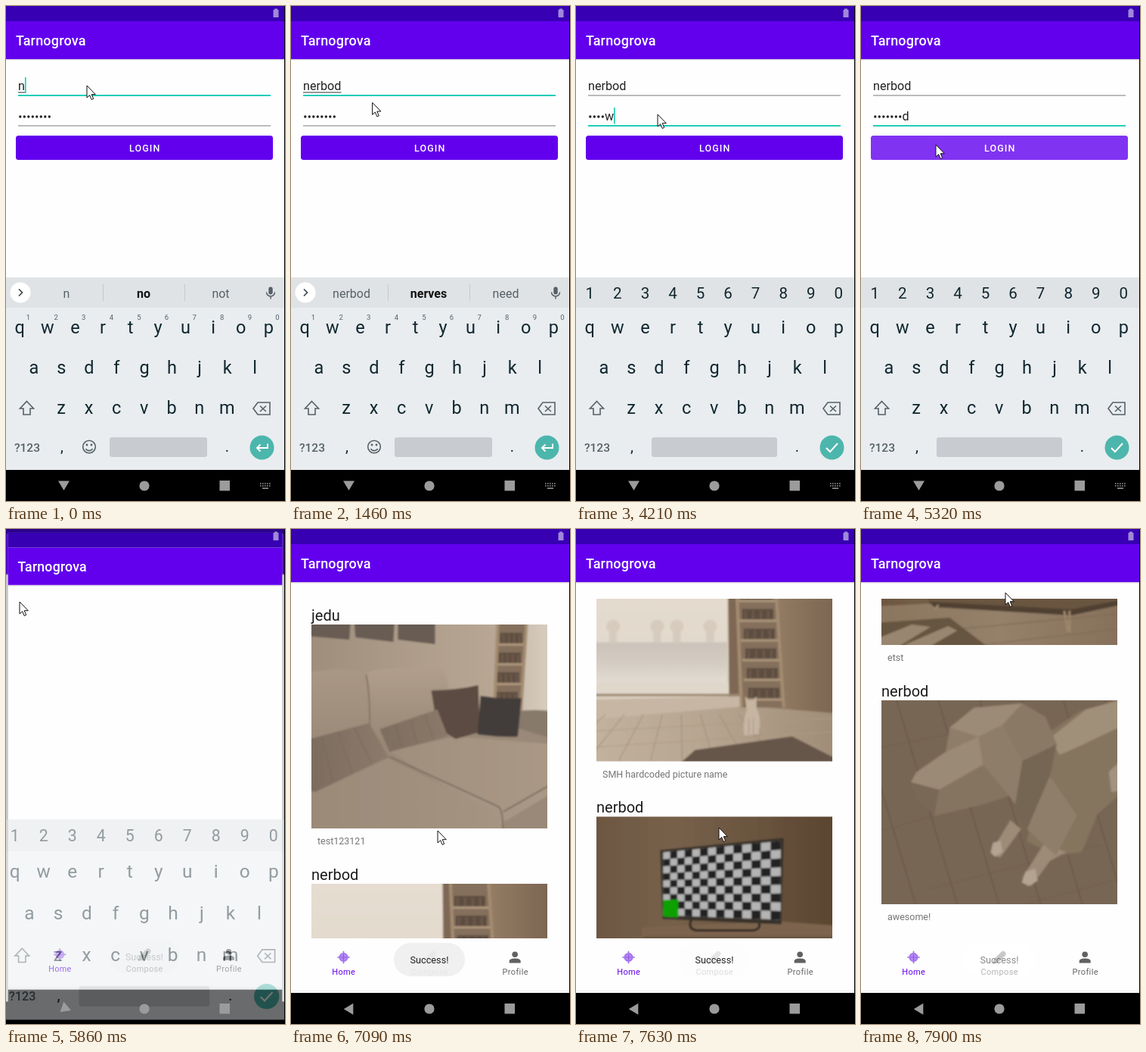
These frames come from a looping animation (369x653 px, 8000 ms). An HTML page:

```html
<!DOCTYPE html>
<html lang="en">
<head>
<meta charset="utf-8">
<title>Login and feed</title>
<style>
html, body { margin: 0; width: 100%; height: 100%; overflow: hidden; background: #000; }
svg { display: block; font-family: Roboto, sans-serif; }
#stage { width: 369px; height: 653px; }
</style>
</head>
<body>
<svg id="stage" viewBox="0 0 369 653" xmlns="http://www.w3.org/2000/svg"></svg>
<script>
const LOOP = 8000;
const APP = 'Tarnogrova', USER = 'nerbod';
const TEAL = '#1fcdb8', PURPLE = '#6200ee', PAPER = '#fefefe';
const svg = document.getElementById('stage');
const pen = document.createElement('canvas').getContext('2d');

// ---- helpers
const clamp = (v, a = 0, b = 1) => Math.min(b, Math.max(a, v));
const range = n => [...Array(n).keys()];
const rect = (x, y, w, h, fill, more = '') =>
  `<rect x="${x}" y="${y}" width="${w}" height="${h}" fill="${fill}" ${more}/>`;
const circle = (x, y, r, fill, more = '') =>
  `<circle cx="${x}" cy="${y}" r="${r}" fill="${fill}" ${more}/>`;
const shape = (d, fill, more = '') => `<path d="${d}" fill="${fill}" ${more}/>`;
const line = (d, color, w = 1, more = '') =>
  `<path d="${d}" fill="none" stroke="${color}" stroke-width="${w}" ${more}/>`;
const text = (x, y, s, size, fill, more = '') =>
  `<text x="${x}" y="${y}" font-size="${size}" fill="${fill}" ${more}>${s}</text>`;
const mid = (x, y, s, size, fill, more = '') => text(x, y, s, size, fill, 'text-anchor="middle" ' + more);
const group = (body, more) => `<g ${more}>${body}</g>`;
const zoom = (k, dy = 0) => `transform="translate(184 ${326 + dy}) scale(${k}) translate(-184 -326)"`;
const latest = (list, t) => list.filter(e => e[0] <= t).pop();
function width(s, size) {
  pen.font = size + 'px Roboto, sans-serif';
  return pen.measureText(s).width;
}
// keys: [time, value, ...]; linear between them
function track(keys, t) {
  const i = keys.findIndex(k => k[0] > t);
  if (i < 0) return keys[keys.length - 1].slice(1);
  if (i === 0) return keys[0].slice(1);
  const a = keys[i - 1], b = keys[i], p = (t - a[0]) / (b[0] - a[0]);
  return a.slice(1).map((v, n) => v + (b[n + 1] - v) * p);
}
let fades = '';
function fade(id, down, ...colors) {
  fades += `<linearGradient id="${id}" x2="${down ? 0 : 1}" y2="${down ? 1 : 0}">` +
    colors.map((c, i) => `<stop offset="${i / (colors.length - 1)}" stop-color="${c}"/>`).join('') + '</linearGradient>';
  return `url(#${id})`;
}

// ---- timing: the screen refreshes in steps [from, to, count]
const STEPS = [[0, 0, 1], [120, 600, 5], [1060, 1060, 1], [1460, 2030, 5], [2310, 2460, 2],
  [2860, 3010, 2], [3540, 3940, 4], [4210, 4210, 1], [4490, 4640, 2], [5010, 5860, 7],
  [5980, 5980, 1], [6140, 7090, 8], [7210, 7630, 4], [7780, 7900, 2]]
  .flatMap(([a, b, n]) => range(n).map(i => n > 1 ? a + (b - a) * i / (n - 1) : a));

const MOUSE = [[0, 107, 105], [1060, 107, 105], [1740, 108, 143], [4640, 108, 143], [5150, 100, 183],
  [5430, 98, 183], [5860, 18, 96], [6410, 18, 96], [7090, 194, 398], [7210, 193, 330],
  [7350, 191, 110], [7490, 190, 240], [7630, 189, 394], [7780, 190, 235], [7900, 191, 84]];
const SCROLL = [[7090, 0], [7210, 60], [7350, 280], [7490, 375], [7630, 430.5], [7780, 650], [7900, 926]];
const SECRET = [[0, 8, ''], [2455, 7, ''], [2860, 3, ''], [3005, 0, ''], [3540, 0, 'p'], [3670, 1, 'a'],
  [3800, 2, 's'], [3935, 3, 's'], [4210, 4, 'w'], [4490, 5, 'o'], [4635, 7, 'd']];
const HINTS = [['n', 'no', 'not'], ['ne', 'new', 'need'], ['ner', 'never', 'nerd'],
  ['nerb', 'nerve', 'herb'], ['nerbo', 'nerve', 'turbo'], [USER, 'nerves', 'need']];

// ---- photos, each 311 x 269
const backdrop = fill => rect(-10, -10, 331, 289, fill);
function ladder(x, y, w, h, lean) {
  const rung = 26;
  let s = shape(`M${x} -9H${x + w}L${x + w + lean} ${y + h}H${x + lean * .6}Z`, '#84705b');
  for (let i = 0; i * rung < h - 20; i++) {
    const dx = lean * (i * rung + 15) / h, yy = y + i * rung;
    s += rect(x + dx + 4, yy, w - 9, 14, '#5d4d41');
    for (const b of range(4)) s += rect(x + dx + 7 + b * (w - 10) / 4, yy + 2, 3, 12, '#6c5a4c');
    s += rect(x + dx, yy + 14, w, 3, '#ad967c');
  }
  return s + line(`M${x} -9L${x + lean * .6} ${y + h}M${x + w} -9L${x + w + lean} ${y + h}`, '#a48c71', 4);
}
function planks(x0, x1, step, d, color) {
  let s = '';
  for (let x = x0; x < x1; x += step) s += `M${x} ${d}`;
  return line(s, color);
}
const sofa = backdrop(fade('wall', 0, '#9e8d7b', '#b09f8c', '#bfae9b')) +
  planks(10, 245, 24, 'v100', '#a08f7d') +
  shape('M280 -9H321V122H270Z', fade('drape', 0, '#c9bcac', '#dad0c3')) +
  shape('M-9 -9H52L50 20 -9 15ZM56 -9H110L108 23 58 17ZM114 -9H163V26L114 20Z', '#685c52') +
  ladder(246, 11, 38, 105, -8) +
  shape('M-9 64Q40 55 65 62Q76 66 77 108V170H-9Z', fade('backL', 1, '#a99885', '#998876')) +
  shape('M72 66Q78 57 120 58L170 57Q185 66 184 150L80 165Z', fade('backR', 1, '#b09f8c', '#968573')) +
  line('M72 66Q78 90 77 160', '#84745f', 2) +
  shape('M262 116Q290 110 321 115V157L264 146Z', '#887a6b') +
  shape('M-9 178L100 160 250 130 321 152V279H-9Z', '#9a8978') +
  shape('M104 167L190 148 321 158V220L251 262Z', fade('seat', 0, '#a18f7d', '#aa9986')) +
  shape('M-9 222L100 177 252 250V279H-9Z', fade('front', 0, '#9b8a78', '#a59482')) +
  line('M102 174L246 240Q254 245 252 279M253 247L321 208', '#75665a', 1.6) +
  shape('M158 87Q195 86 220 80L222 142 190 151 166 136Z', '#5b4c42') +
  shape('M223 94Q250 99 277 97L272 148Q245 149 219 145Z', '#423c3a') +
  shape('M-9 153L76 130 102 175 5 221 -9 217Z', fade('cushL', 0, '#7b6b5d', '#8c7b6b')) +
  shape('M90 138L166 112 180 148 103 168Z', fade('cushR', 0, '#7d6d5f', '#8b7a69')) +
  line('M14 150L28 206M35 142L54 196M57 137L80 184M110 132L120 161M130 126L140 157M150 119L161 152', '#78695c');

const room = backdrop(fade('side', 0, '#a58d74', '#a58d74', '#9b836a', '#7a6350')) +
  rect(-9, -9, 184, 197, '#d9cdbd') + rect(-9, -9, 181, 123, fade('blind', 1, '#e6ddd1', '#e2d9cd')) +
  rect(-9, 112, 181, 54, fade('pane', 1, '#cbc3b9', '#d4ccc2', '#e4ddd3')) +
  [22, 80, 106, 150].map(x => circle(x, 91, 9, '#cfc2b2', 'opacity=".6"') + rect(x - 5, 98, 10, 14, '#d6cbbf')).join('') +
  rect(-9, 164, 184, 16, '#e0d7cb') +
  shape('M173 -9H182L188 190H175Z', '#7e6855') + rect(-9, 180, 197, 3, '#9a8670') +
  planks(252, 311, 20, 'v186', '#8c745e') +
  shape('M-9 188L190 183V199L-9 215Z', '#c6b6a3') +
  shape('M-9 214L200 196 321 206V279H-9Z', fade('floor', 0, '#c3b39e', '#b5a48f', '#a08c76')) +
  range(8).map(i => line(`M${12 + i * 25} 207L${-55 + i * 42} 269`, '#a08d78')).join('') +
  line('M0 229L311 212M0 250L311 230', '#ad9a84') +
  ladder(183, 16, 50, 182, 14) +
  shape('M130 254L258 236 321 268V279H102Z', '#66564a') +
  shape('M196 183L200 188H207L211 183 211 199Q218 211 214 233L195 235Q192 218 198 202Z', '#c6b6a1') +
  line('M201 212V233M207 212V233M213 226Q224 237 205 235', '#a39180');

// the board recedes to the left, so columns widen to the right
function checker(cols, rows) {
  const at = (c, r) => {
    const u = c / cols, v = r / rows, x = u / (1.22 - .22 * u);
    const top = 47 - 15 * x, low = 130 + 6 * x;
    return [(88 + 155 * x).toFixed(1), (top + (low - top) * v).toFixed(1)];
  };
  let d = '';
  for (const c of range(cols)) for (const r of range(rows))
    if ((c + r) % 2) d += `M${at(c, r)}L${at(c + 1, r)} ${at(c + 1, r + 1)} ${at(c, r + 1)}Z`;
  return d;
}
const tv = backdrop(fade('den', 0, '#6c5641', '#77614b', '#6a543f', '#59442f')) +
  planks(20, 311, 36, 'v150', '#665039') +
  shape('M60 146L240 138 321 144V160H60Z', '#7b644d') +
  shape('M62 158H321V212L250 224 62 214Z', '#69543f') +
  line('M125 136Q120 148 132 150H206Q218 149 214 138', '#2d2621', 3) +
  shape('M84 44L247 28 244 142 87 135Z', '#39322c') +
  shape('M88 47L243 32 243 136 88 130Z', '#b4b4b4') +
  shape(checker(14, 9), '#242424') + shape('M88 110L108 109V133L88 132Z', '#0aa000') +
  shape('M-9 218L70 214 250 224 321 210V279H-9Z', fade('rugside', 0, '#8a755e', '#95806a', '#86705a')) +
  shape('M62 212L250 222 321 209V215L250 230 70 219Z', '#4f4032') +
  line('M75 216L71 222M241 224L246 252M248 224L248 252', '#9d866a', 3) +
  line('M60 252L311 228M130 269L311 248', '#7d6953') +
  shape('M-9 240L90 233 150 279H-9Z', '#66543f') +
  shape('M-9 262L40 242 65 245 10 279H-9ZM30 269L88 244 100 250 62 272Z', '#99866f');

const dog = backdrop('#786654') +
  range(9).map(i => line(`M${-90 + i * 55} 0L${-10 + i * 55} 269`, '#695848', 1.5)).join('') +
  line('M0 62L90 45M0 172L110 140M60 250L290 190M190 269L311 236', '#6e5d4c') +
  shape('M218 44L262 14 285 8 321 -5V118L285 150 264 200 230 205 192 186Z', '#85745f') +
  shape('M222 50L270 12 321 -2V32L262 60 235 72Z', '#a19079') +
  shape('M300 94L321 75V118L303 121Z', '#a39280') +
  shape('M170 158L146 198 147 205 157 207 184 170ZM214 190L187 232 186 241 198 245 222 212 244 200Z', '#9c8b76') +
  shape('M147 188L157 185 160 200 150 206 144 201ZM190 226L203 222 206 238 194 245 185 240Z', '#b3a390') +
  shape('M39 108L46 95 85 68 90 36 122 10 186 4 216 22 231 58 222 84 186 150 168 126 130 138 70 152 49 131Z', '#8e7d69') +
  shape('M90 36L122 10 186 4 160 32 128 48Z', '#9c8b77') +
  shape('M46 95L85 68 128 48 134 85 76 118 39 108Z', '#9b8a76') +
  shape('M39 108L76 118 70 152 49 131Z', '#786755') +
  shape('M76 118L134 85 168 126 130 138 70 152Z', '#857461') +
  shape('M186 4L216 22 231 58 186 80 160 32Z', '#8a7965') +
  shape('M186 80L231 58 222 100 192 170 176 140Z', '#756553') +
  shape('M192 170L222 100 258 152 230 205Z', '#8f7e69');

const POSTS = [['jedu', 'test123121', sofa, 6680], [USER, 'SMH hardcoded picture name', room, 6810],
  [USER, 'etst', tv, 6900], [USER, 'awesome!', dog, 6900]];
const DEFS = `<defs>${fades}<clipPath id="list"><path d="M0 92H368V540H0Z"/></clipPath>` +
  '<filter id="soft"><feGaussianBlur stdDeviation=".9"/></filter></defs>';

// ---- screen parts
const bars = rect(0, 0, 368, 20, '#3700b3') + rect(0, 20, 368, 50, PURPLE) +
  rect(0, 70, 368, 1, '#cfc9da') + rect(0, 71, 368, 1, '#efedf2') +
  text(13, 52, APP, 18, '#fff', 'font-weight="500" letter-spacing=".2"');
const page = rect(0, 0, 368, 612, PAPER) + bars;

function login(t) {
  const second = t >= 1735, [since, dots, tail] = latest(SECRET, t);
  const name = USER.slice(0, 1 + Math.floor(clamp(t / 120, 0, 5)));
  const event = Math.max(Math.min(t, 600), second ? 1740 : 0, since);
  const caretOn = Math.floor((t - event) / 460) % 2 === 0;
  const field = (y, on) => on ? rect(16, y - 1, 334, 2, TEAL) : rect(16, y - .5, 334, 1, '#7b7b7b');
  const nameEnd = 16 + width(name, 16.2), tailX = 16 + dots * 5.5;
  let s = page + text(16, 111, name, 16.2, '#222') + field(118, !second) + field(158, second);
  if (!second) s += rect(16, 113.5, nameEnd - 16, 1, '#333');
  s += range(dots).map(i => circle(18.8 + i * 5.5, 146, 1.7, '#222')).join('') + text(tailX, 151, tail, 16.2, '#222');
  s += rect(13, 171, 340, 32, PURPLE, 'rx="3.5"');
  if (t > 5140 && t < 5700) s += rect(13, 171, 340, 32, '#fff', 'rx="3.5" opacity=".2"');
  s += text(163, 191.7, 'LOGIN', 12.5, '#fff', 'font-weight="500" letter-spacing="1.1"');
  if (caretOn) s += second ? rect(tailX + width(tail, 16.2) - .2, 134, 1.7, 21.5, TEAL)
    : rect(nameEnd, 94, 1.7, 21, TEAL);
  if (t > 1880 && t < 2440) s += shape('M60.5 158L67 164.5A9 9 0 1 1 54 164.5Z', TEAL);
  return s;
}

function keyboard(t) {
  const secret = t >= 1880, ink = '#10272f', soft = '#566167';
  let s = rect(0, 358, 368, 254, '#e9edf0') + rect(0, 358, 368, 40, '#e0e3e5');
  const row = (keys, x, y, size) => [...keys].map((k, i) => mid(x + i * 36.55, y, k, size, ink)).join('');
  if (secret) s += row('1234567890', 18.3, 386, 20.5);
  else {
    const words = HINTS[Math.floor(clamp(t / 120, 0, 5))];
    s += circle(19, 378, 13.5, '#fff') + line('M17 373.5L21.5 378 17 382.5', '#3c4549', 1.7) +
      rect(128, 367, 1, 22, '#c5c9cb') + rect(236, 367, 1, 22, '#c5c9cb') +
      words.map((w, i) => mid(80 + i * 102, 384.5, w, 16, i === 1 ? '#111' : soft, i === 1 ? 'font-weight="700"' : '')).join('') +
      rect(347.3, 370.5, 5.4, 10, soft, 'rx="2.7"') + line('M344.5 377.5a5.5 5.5 0 0 0 11 0M350 383v3.5', soft, 1.5) +
      [...'1234567890'].map((k, i) => mid(29.5 + i * 36.6, 414, k, 9.5, soft)).join('');
  }
  s += row('qwertyuiop', 18.3, 432, 23.5) + row('asdfghjkl', 36.8, 485, 23.5) + row('zxcvbnm', 73, 538, 23.5);
  s += line('M27.5 521.5L36.5 531H32V539H23V531H18.5Z', soft, 1.6) +
    line('M333 523H349V539H333L327 531ZM336 527.5L344 535M344 527.5L336 535', soft, 1.6);
  s += mid(28, 587.5, '?123', 15.5, soft, 'font-weight="500"') + mid(74, 588, ',', 20, ink) + mid(292.5, 588, '.', 20, ink);
  if (secret) s += rect(100, 569, 166, 26, '#c8ccd0', 'rx="3"');
  else s += rect(137, 569, 129, 26, '#c8ccd0', 'rx="3"') + line('M105.5 584a4.8 4 0 0 0 9 0', soft, 1.6) +
    circle(110, 581.5, 8.3, 'none', `stroke="${soft}" stroke-width="1.6"`) + circle(107, 579, 1.4, soft) + circle(113, 579, 1.4, soft);
  return s + circle(338.5, 582.5, 16, '#4db6ac') +
    line(secret ? 'M331 583L336 588 346 577' : 'M346 577.5V583H332M336.5 578.5L332 583 336.5 587.5', '#fff', 2);
}

function feed(t) {
  const [y] = track(SCROLL, t);
  let posts = '';
  if (t >= 6400) POSTS.forEach(([who, note, photo, ready], i) => {
    const top = 126 + 342 * i - y;
    if (top > 560 || top < -320) return;
    posts += text(27, top - 5.5, who, 20, '#1c1c1c');
    if (t >= ready) posts += `<svg x="27" y="${top}" width="312" height="269" viewBox="0 0 311 269" ` +
      `preserveAspectRatio="none">${group(photo, 'filter="url(#soft)"')}</svg>`;
    posts += text(35, top + 290, note, 12.5, '#757575');
  });
  const tab = (x, s, color) => mid(x, 588, s, 11, color, 'letter-spacing=".35"');
  return page + group(posts, 'clip-path="url(#list)"') + rect(0, 608, 368, 4, '#f5f5f6') +
    line('M69.5 556.8V573.2M61.3 565H77.7', '#9f6cee', 1.6) +
    circle(69.5, 565, 5.2, '#b58df3', 'stroke="#a272ef" stroke-width="1.8"') +
    line('M69.5 561V569M65.5 565H73.5', '#9257e9', 1.2) +
    shape('M174 573.5L175.5 568 185.5 558Q188 555.5 190.5 558T190.5 563L180 573Z', '#9a9a9a') +
    circle(296.2, 561.3, 3.8, '#616161') + shape('M288.7 572.5V570Q288.7 566.5 296.2 566.5T303.7 570V572.5Z', '#616161') +
    tab(69.7, 'Home', PURPLE) + tab(183.2, 'Compose', '#757575') + tab(296.7, 'Profile', '#666');
}

function toast(t) {
  const [box, label, tone] = track([[5710, 0, 0, 239], [5860, .35, .35, 239], [6140, .93, 1, 239],
    [7350, .93, 1, 239], [7630, .76, 1, 253], [7900, .45, .52, 254]], t);
  return rect(136, 546, 94, 44, `rgb(${tone},${tone},${tone})`, `rx="22" opacity="${box}"`) +
    mid(183, 573, 'Success!', 12.7, '#222', `opacity="${label}"`);
}

function system(t) {
  const turn = 90 * clamp((t - 5710) / 270), grey = '#9b9b9b';
  let s = shape('M69 626.5H84L76.5 639Z', grey, `transform="rotate(${turn} 76 632.8)"`) +
    circle(183, 633, 6.6, grey) + rect(282.5, 626, 13.5, 13.5, grey) +
    shape('M355 3.5H359V5H360.5V15H353.5V5H355Z', '#9f88d9');
  if (t < 5700) s += line('M336 630H350M336 633H350', grey, 1.6, 'stroke-dasharray="1.6 1.4"') + rect(339, 635.5, 8, 1.5, grey);
  return s;
}

const mouse = ([x, y]) => shape('M.5 .5V16.5L4.2 13.2 6.7 19 9.2 17.9 6.7 12.2H11.8Z', '#fff',
  `stroke="#111" stroke-width="1" transform="translate(${x - .5} ${y - .5})"`);

function scene(t) {
  const p = clamp((t - 5650) / 450), rest = (1 - p) ** 3;
  let s = DEFS + rect(0, 0, 369, 653, '#000');
  if (p < 1) {
    const grow = 1 + .047 * (1 - rest);
    s += group(login(t), zoom(grow));
    if (p > 0) {
      s += rect(0, 0, 369, 653, '#000', `opacity="${.45 * p}"`) +
        group(feed(t) + rect(0, 612, 368, 41, '#000') + toast(t), zoom(1 - .1 * rest) + ` opacity="${clamp(p * 2.2)}"`);
    }
    s += group(keyboard(t), zoom(grow, 24 * (p / .467) ** 2) + ` opacity="${clamp(1 - p * 1.18)}"`);
    if (p === 0) s += rect(0, 612, 369, 41, '#000');
  } else s += feed(t) + toast(t);
  return s + system(t) + rect(368, 0, 1, 653, '#000') + mouse(track(MOUSE, t));
}

let shown = -1;
const start = performance.now();
function tick() {
  const now = (performance.now() - start) % LOOP;
  const t = STEPS.filter(v => v <= now).pop() ?? 0;
  if (t !== shown) svg.innerHTML = scene(shown = t);
  requestAnimationFrame(tick);
}
tick();
</script>
</body>
</html>
```
